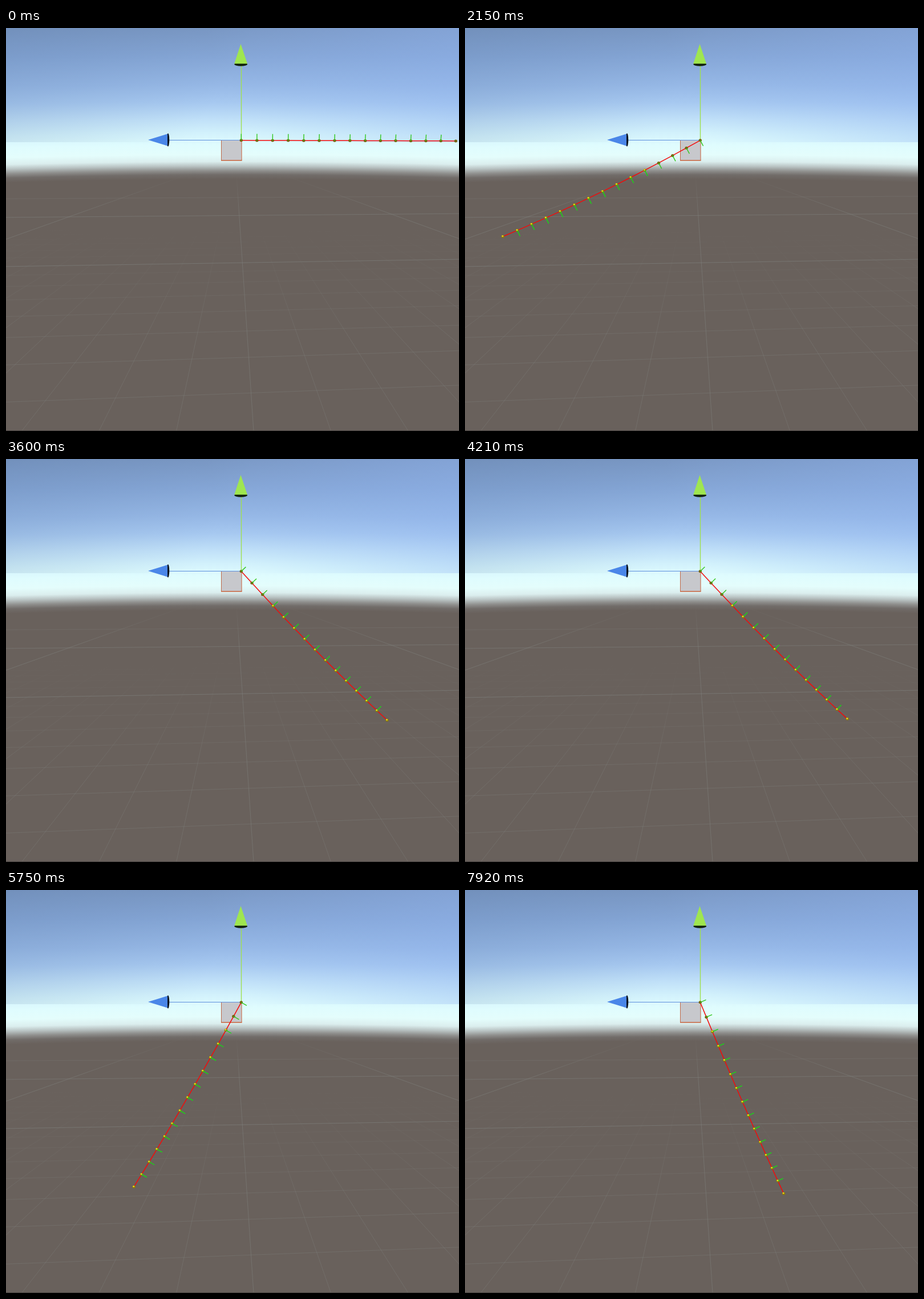
These frames come from a looping animation (794 px wide and 706 px high, 8000 ms). An HTML page with a canvas:

```html
<!DOCTYPE html>
<html lang="en">
<head>
<meta charset="utf-8">
<title>Swinging chain</title>
<style>
html, body { margin: 0; width: 100%; height: 100%; overflow: hidden; background: #69615c; }
canvas { display: block; width: 794px; height: 706px; }
</style>
</head>
<body>
<canvas id="stage" width="794" height="706"></canvas>
<script>
const W = 794, H = 706, LOOP = 8000;
const FIRST_STEP = 62, STEP = 76.9;
const SEGMENTS = 14;
const ROOT = { x: 412.3, y: 196.8 };
const ctx = document.getElementById('stage').getContext('2d');

// Swing angle of the chain in degrees from straight down, right is positive.
const SWING = [
  [70, 71], [300, 51], [550, 23], [840, -12.4], [990, -31], [1675, -76],
  [2150, -64.2], [2530, -37.6], [3370, 34.4], [3600, 44.9], [3860, 49.5],
  [4210, 43.9], [4830, 11.7], [5060, -2.9], [5910, -33.5], [6770, -10.9],
  [7610, 20.4], [7920, 24.1]
];

function line(c, x1, y1, x2, y2, color, width = 1) {
  c.strokeStyle = color;
  c.lineWidth = width;
  c.beginPath();
  c.moveTo(x1, y1);
  c.lineTo(x2, y2);
  c.stroke();
}

function polygon(c, points, color) {
  c.fillStyle = color;
  c.beginPath();
  points.forEach(([x, y]) => c.lineTo(x, y));
  c.fill();
}

function ellipse(c, x, y, rx, ry, color) {
  c.fillStyle = color;
  c.beginPath();
  c.ellipse(x, y, rx, ry, 0, 0, 7);
  c.fill();
}

function drawSky(c) {
  const stops = [
    [0, '#7a98c4'], [50, '#85a6d6'], [100, '#96b8e6'], [130, '#a6c8f0'],
    [160, '#c0e0f8'], [185, '#d3f2fc'], [205, '#dffcfe'], [222, '#e4fdfc'],
    [234, '#dbeeee'], [242, '#b9c3c3'], [250, '#8f8f8d'], [257, '#716c69'],
    [265, '#69615c']
  ];
  // The horizon sinks a little towards both sides.
  for (let x = 0; x < W; x++) {
    const bottom = 265 + 6 * ((x - 400) / 400) ** 2;
    const g = c.createLinearGradient(0, 0, 0, bottom);
    stops.forEach(([y, color]) => g.addColorStop(y / 265, color));
    c.fillStyle = g;
    c.fillRect(x, 0, 1, bottom);
  }
  const shade = c.createLinearGradient(0, 0, 330, 190);
  shade.addColorStop(0, 'rgba(80,110,150,.18)');
  shade.addColorStop(1, 'rgba(80,110,150,0)');
  c.fillStyle = shade;
  c.fillRect(0, 0, W, 200);
  const light = c.createLinearGradient(W, 0, 420, 170);
  light.addColorStop(0, 'rgba(145,180,240,.4)');
  light.addColorStop(1, 'rgba(145,180,240,0)');
  c.fillStyle = light;
  c.fillRect(0, 0, W, 200);
}

function fade(c, from, to, alpha) {
  const g = c.createLinearGradient(0, from, 0, to);
  g.addColorStop(0, 'rgba(128,130,126,0)');
  g.addColorStop(1, `rgba(128,130,126,${alpha})`);
  return g;
}

function drawGrid(c) {
  const horizon = 227;
  const minor = fade(c, 350, 560, .36);
  for (let n = -1; n < 16; n++) {
    const y = horizon + 1 / (.002418 + .000433 * n);
    if (n === 7) continue;
    const tilt = (y - 237) * .000092;
    line(c, 0, y + 397 * tilt, W, y - 397 * tilt, minor);
  }
  for (const [y, alpha] of [[411.5, .62], [328.5, .55], [297, .3]]) {
    const tilt = (y - 237) * .000092;
    line(c, 0, y + 397 * tilt, W, y - 397 * tilt, `rgba(128,130,126,${alpha})`);
  }
  for (let n = -9; n < 10; n++) {
    if (n) line(c, 402, horizon, 434 + 135.5 * n, H, minor);
  }
  const major = fade(c, 255, 330, .5);
  line(c, 402, horizon, 434, H, major);
  line(c, 402, horizon, 0, 370, major);
  line(c, 402, horizon, W, 369, major);
}

function drawHandles(c) {
  c.fillStyle = '#c7c8cc';
  c.fillRect(377, 197, 36, 35);
  line(c, 377, 196.5, 413, 196.5, '#a5adba');
  line(c, 377.5, 197, 377.5, 232, '#c06a4a');
  line(c, 377, 232, 413.5, 232, '#c8603a', 1.5);
  line(c, 413, 197, 413, 232, '#c8603a');

  line(c, 412.5, 65, 412.5, 197, '#9fe04f', 1.4);
  ellipse(c, 411.7, 63.5, 11.5, 3.2, '#10200c');
  polygon(c, [[411.5, 28], [423, 62.5], [400.2, 62.5]], '#9fe650');

  line(c, 285, 196.5, 412, 196.5, '#5f90dd');
  ellipse(c, 284, 196, 2.3, 11.5, '#0c1420');
  polygon(c, [[249, 196], [283, 185.5], [283, 206.5]], '#4a86e8');
}

const backdrop = document.createElement('canvas');
backdrop.width = W;
backdrop.height = H;
{
  const c = backdrop.getContext('2d');
  c.fillStyle = '#69615c';
  c.fillRect(0, 0, W, H);
  drawSky(c);
  drawGrid(c);
  drawHandles(c);
  c.fillStyle = '#45413f';
  c.fillRect(0, 705, W, 1);
}

// Slope at a key: flat at turning points, otherwise set by the neighbours.
function slope(i) {
  const a = SWING[i - 1], b = SWING[i], d = SWING[i + 1];
  if (!a) return -.08;
  if (!d) return .004;
  const s1 = (b[1] - a[1]) / (b[0] - a[0]);
  const s2 = (d[1] - b[1]) / (d[0] - b[0]);
  if (s1 * s2 <= 0) return 0;
  const w = (b[0] - a[0]) / (d[0] - a[0]);
  return s1 * (1 - w) + s2 * w;
}

function swing(t) {
  t = Math.min(Math.max(t, 70), 7920);
  let i = 0;
  while (i < SWING.length - 2 && SWING[i + 1][0] < t) i++;
  const [t0, a0] = SWING[i], [t1, a1] = SWING[i + 1];
  const span = t1 - t0, u = (t - t0) / span, v = 1 - u;
  return a0 * v * v * (1 + 2 * u) + a1 * u * u * (1 + 2 * v)
    + span * u * v * (slope(i) * v - slope(i + 1) * u);
}

// Perspective of the vertical plane in which the chain swings.
function project(x, y) {
  const depth = 1 + .00197 * x + .0052 * y;
  const dx = 27.6 * x / depth;
  return { x: ROOT.x + dx, y: ROOT.y + 28.2 * y / depth + .003 * dx };
}

function chain(angle, bend) {
  const nodes = [];
  let x = 0, y = 0;
  for (let i = 0; i <= SEGMENTS; i++) {
    const a = (angle + bend * ((i + .5) / SEGMENTS - .5)) * Math.PI / 180;
    const dx = Math.sin(a), dy = Math.cos(a);
    nodes.push({ at: project(x, y), tick: project(x + .4 * dy, y - .4 * dx) });
    x += dx;
    y += dy;
  }
  return nodes;
}

function drawChain(nodes) {
  ctx.strokeStyle = '#f50a0a';
  ctx.lineWidth = 1.5;
  ctx.beginPath();
  nodes.forEach(n => ctx.lineTo(n.at.x, n.at.y));
  ctx.stroke();
  nodes.forEach(({ at, tick }, i) => {
    const overGround = at.y > 245;
    ellipse(ctx, at.x, at.y, 2.7, 2.5, overGround ? '#8c7a0c' : '#75640f');
    if (i < SEGMENTS) {
      line(ctx, at.x, at.y, tick.x, tick.y, overGround ? '#12e012' : '#32c81e', 1.4);
    }
    if (overGround) ellipse(ctx, at.x - .5, at.y - .7, 1.5, 1.3, '#f0d820');
  });
}

function draw(now) {
  const t = now % LOOP;
  ctx.drawImage(backdrop, 0, 0);
  if (t < FIRST_STEP) {
    drawChain(chain(90, 0));
  } else {
    const time = FIRST_STEP + Math.floor((t - FIRST_STEP) / STEP) * STEP + 8;
    const angle = swing(time);
    const whip = 8 * Math.exp(-(((time - 970) / 280) ** 2));
    drawChain(chain(angle, .1 * angle - whip));
  }
}

const start = performance.now();
function tick() {
  draw(performance.now() - start);
  requestAnimationFrame(tick);
}
tick();
</script>
</body>
</html>
```
